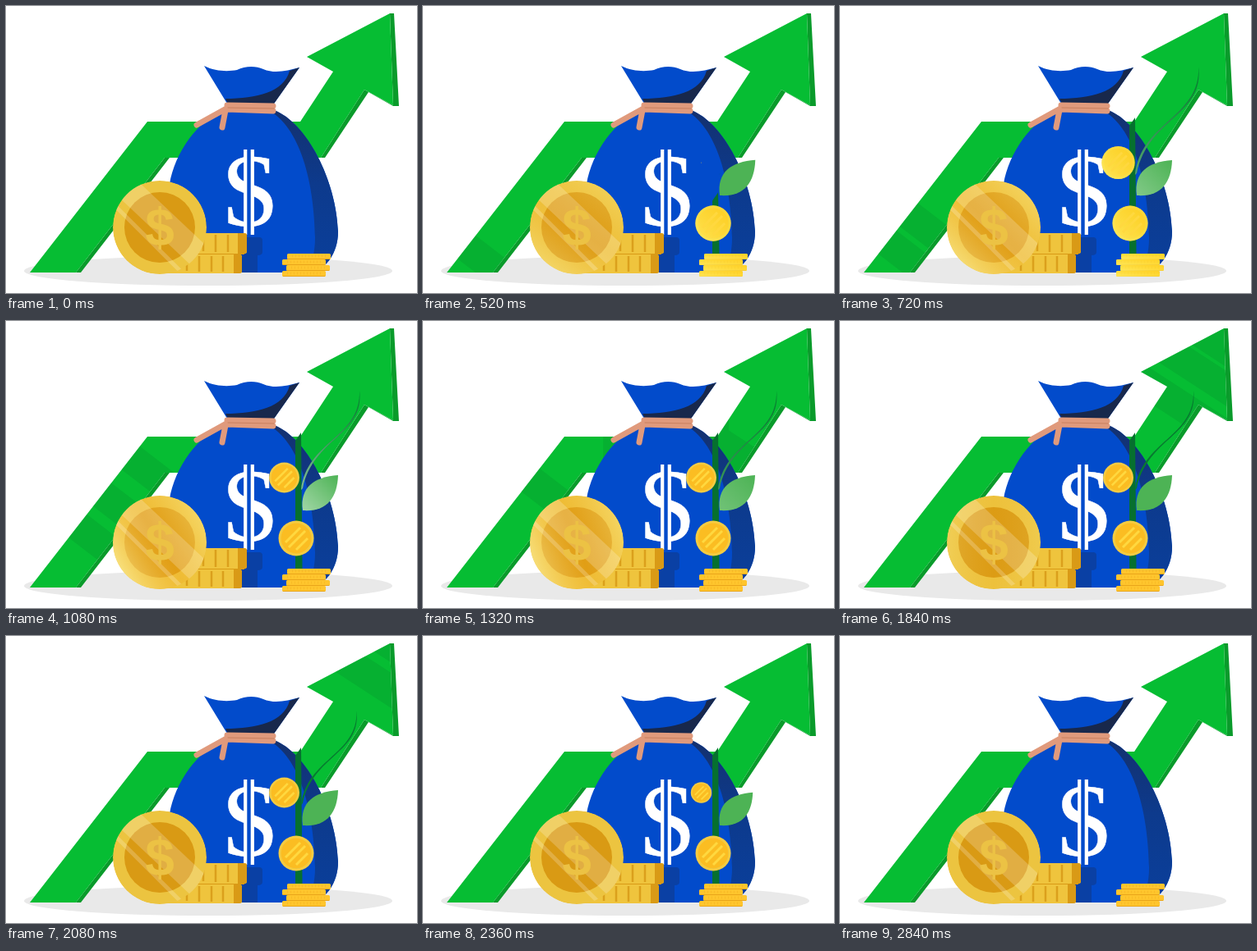
An HTML page for the animation above (2880 ms loop, 500 by 350 pixels).

```html
<!DOCTYPE html>
<html lang="en">
<head>
<meta charset="utf-8">
<title>Growing savings</title>
<style>
  html, body { margin: 0; width: 100%; height: 100%; overflow: hidden; background: #fff; }
  svg { display: block; width: 500px; height: 350px; }
  text { text-anchor: middle; }
</style>
</head>
<body>
<svg viewBox="0 0 500 350">
  <defs>
    <path id="arrow" d="M29 325 172 141H358L398 80 366 62 467 9 471 121 436 102 383 185H193L85 325Z"/>
    <clipPath id="arrowClip"><use href="#arrow"/></clipPath>
    <path id="body" d="M269 127C234 136 205 180 199 217C190 255 190 300 205 325H365C388 325 404 302 404 275C402 213 366 142 326 127Z"/>
    <clipPath id="bodyClip"><use href="#body"/></clipPath>
    <clipPath id="coinClip"><circle cx="187" cy="270" r="57"/></clipPath>
    <linearGradient id="shade" x2="0" y2="1">
      <stop stop-color="#14316f"/><stop offset=".45" stop-color="#0d3a8c"/><stop offset="1" stop-color="#0a3f9c"/>
    </linearGradient>
    <linearGradient id="gleam">
      <stop stop-color="#fff0a0" stop-opacity=".6"/>
      <stop offset=".5" stop-color="#f5a818" stop-opacity=".3"/>
      <stop offset="1" stop-color="#ffe98a" stop-opacity=".45"/>
    </linearGradient>
    <linearGradient id="glow" y1="1" x2="1" y2="0">
      <stop stop-color="#fff36a" stop-opacity=".8"/><stop offset="1" stop-color="#ffdf20" stop-opacity=".5"/>
    </linearGradient>
    <linearGradient id="leafLight" y1="1" x2="1" y2="0">
      <stop stop-color="#fff" stop-opacity=".5"/><stop offset="1" stop-color="#fff" stop-opacity="0"/>
    </linearGradient>
    <g id="smallCoin">
      <circle r="21.5" fill="#f4cb42"/>
      <circle r="18.5" fill="#fbbd22"/>
      <circle class="glow" r="21.5" fill="url(#glow)"/>
      <path d="M-13 5 5-13M-9 11 11-9M0 14 14 0" stroke="#ffd83f" stroke-width="3"/>
    </g>
    <path id="leaf" d="M361 231C357 203 375 190 404 188C403 216 390 233 361 231Z"/>
    <path id="vine" d="M359 206C366 146 432 142 430 85C436 140 374 142 361 204Z"/>
  </defs>

  <ellipse cx="246" cy="323" rx="224" ry="18" fill="#e9e9e9"/>

  <path d="M467 9H472L478 122H471L441 105 388 185H383L436 102 471 121ZM193 185H199L91 325H85Z" fill="#0a9b2b"/>
  <use href="#arrow" fill="#06bd33"/>
  <g id="bands" clip-path="url(#arrowClip)" fill="none" stroke="#07752a" stroke-opacity=".18" stroke-width="130"></g>

  <use href="#body" fill="#024bcb"/>
  <g clip-path="url(#bodyClip)">
    <path d="M318 126C362 150 375 225 376 282Q376 310 364 326H410V126Z" fill="url(#shade)"/>
    <path d="M270 282H308Q312 282 312 286V300Q312 304 306 304V326H270Z" fill="#0a40a4"/>
  </g>
  <path d="M241 73C255 80 270 80 281 78C291 73 304 73 313 77C327 83 342 79 357 75L326 119H269Z" fill="#024bcb"/>
  <path d="M357 75 345 79C338 105 305 113 267 113L270 119H326Z" fill="#18284c"/>
  <g fill="none" stroke="#e09a7c" stroke-width="7" stroke-linecap="round">
    <path d="M268 125 232 145M267 127 263 148M269 121 325 122M269 126 325 128"/>
    <path d="M270 124 326 125" stroke="#c9805f" stroke-width="1"/>
  </g>
  <text x="297" y="268" font-size="126" font-family="'Liberation Serif', serif" fill="#fff" stroke="#fff" stroke-width=".5">S</text>
  <path d="M295.5 176V278" stroke="#024bcb" stroke-width="5"/>
  <path d="M291.2 175V279M299.8 175V279" stroke="#fff" stroke-width="4.2"/>

  <g id="pile">
    <rect x="205" y="277" width="88" height="25" rx="3" fill="#efc43d"/>
    <rect x="195" y="303" width="92" height="23" rx="3" fill="#efc43d"/>
    <path d="M282 277H290Q293 277 293 280V299Q293 302 290 302H282ZM277 303H284Q287 303 287 306V323Q287 326 284 326H277Z" fill="#d99a16"/>
    <path d="M240 281V299M255 279V300M270 279V300M220 307V323M235 305V324M250 305V324M264 305V324" stroke="#dba01c" stroke-width="2.5"/>
    <path d="M218 302.5H290" stroke="#d99a16"/>
  </g>

  <g clip-path="url(#coinClip)">
    <circle cx="187" cy="270" r="57" fill="#ecc440"/>
    <circle cx="187" cy="270" r="43" fill="#d99a14"/>
    <circle id="coinGleam" cx="187" cy="270" r="57" fill="url(#gleam)"/>
    <g stroke="#fff" stroke-opacity=".2">
      <path d="M139 214 254 323" stroke-width="30"/>
      <path d="M125 236 215 326" stroke-width="5"/>
    </g>
    <text x="187" y="292" font-size="64" font-weight="700" font-family="'Liberation Sans', sans-serif" fill="#ecc244">$</text>
  </g>

  <polygon id="stem" fill="#06702f"/>
  <g id="vinePart">
    <use href="#vine" fill="#087a30"/>
    <use class="light" href="#vine" fill="url(#leafLight)"/>
  </g>
  <g id="leafPart">
    <use href="#leaf" fill="#4db355"/>
    <use class="light" href="#leaf" fill="url(#leafLight)"/>
  </g>
  <g id="lowCoin"><use href="#smallCoin"/></g>
  <g id="highCoin"><use href="#smallCoin"/></g>

  <g id="stack"></g>
</svg>

<script>
const LOOP = 2880;
const $ = id => document.getElementById(id);
const ramp = (t, a, b) => Math.min(1, Math.max(0, (t - a) / (b - a)));
const bump = (t, a, b) => Math.sin(Math.PI * ramp(t, a, b));
const backOut = p => 1 + 2.7 * (p - 1) ** 3 + 1.7 * (p - 1) ** 2;

// Overshooting entrance, accelerating exit
const grow = (t, start, end, endLength) =>
  t < start ? 0 : backOut(ramp(t, start, start + 300)) * (1 - ramp(t, end, end + endLength) ** 2);

// Distance along the arrow at each time
const travel = [[420, -20], [520, 20], [720, 70], [930, 130], [1080, 180],
  [1260, 375], [1430, 440], [1600, 500], [1740, 525], [2160, 640]];
function distance(t) {
  for (let i = 1; i < travel.length; i++) {
    const [t0, d0] = travel[i - 1], [t1, d1] = travel[i];
    if (t <= t1) return d0 + (d1 - d0) * ramp(t, t0, t1);
  }
  return 640;
}

function scaleAt(id, x, y, s) {
  $(id).setAttribute('transform', `translate(${x} ${y}) scale(${s})`);
}
function scaleAround(id, x, y, s) {
  $(id).setAttribute('transform', `translate(${x} ${y}) scale(${s}) translate(${-x} ${-y})`);
}
function setOpacity(selector, value) {
  document.querySelectorAll(selector).forEach(el => el.style.opacity = value);
}

$('bands').innerHTML = '<path d="M60 325 185 163H372L475 5"/>'.repeat(3);
const bands = [...$('bands').children];

$('stack').innerHTML = [[342, 302], [336, 309], [341, 316], [336, 323]].map(([x, y]) => `
  <rect x="${x}" y="${y}" width="53" height="7" rx="1.5" fill="#ffc52d"/>
  <path d="M${x + 1} ${y + 6.5}h51" stroke="#e9a51a"/>
  <path d="M${x + 6} ${y + 3}h41" stroke="#f8bb25" stroke-width="3" stroke-dasharray="1 3"/>
  <rect class="glow" x="${x}" y="${y}" width="53" height="7" rx="1.5" fill="url(#glow)"/>`).join('');

function draw(t) {
  bands.forEach((band, i) => {
    const d = distance(t - i * 170);
    const from = Math.max(0, d - 18), length = Math.max(0, d + 18 - from);
    band.setAttribute('stroke-dasharray', `0 ${from} ${length} 2000`);
    band.style.display = length > 0 && from < 580 ? '' : 'none';
  });

  const height = 166 * ramp(t, 280, 640) ** 2 * (1 - ramp(t, 2400, 2800) ** 2);
  const top = 302 - height;
  $('stem').setAttribute('points', `352,302 352,${Math.min(302, top + 10)} 359,${top} 360.5,302`);

  scaleAround('vinePart', 360, 206, grow(t, 520, 2000, 360));
  scaleAround('leafPart', 361, 231, grow(t, 240, 2280, 320));
  scaleAt('lowCoin', 353, 265, grow(t, 240, 2360, 360));
  scaleAt('highCoin', 338.5, 191, 0.86 * grow(t, 520, 2160, 360));

  setOpacity('.glow', bump(t, 240, 1040));
  setOpacity('.light', bump(t, 540, 1440));
  $('coinGleam').style.opacity = bump(t, 120, 2080);
  $('gleam').setAttribute('gradientTransform', `rotate(${80 * ramp(t, 120, 2080) - 70} .5 .5)`);
}

function frame(now) {
  draw(now % LOOP);
  requestAnimationFrame(frame);
}
draw(0);
requestAnimationFrame(frame);
</script>
</body>
</html>
```
